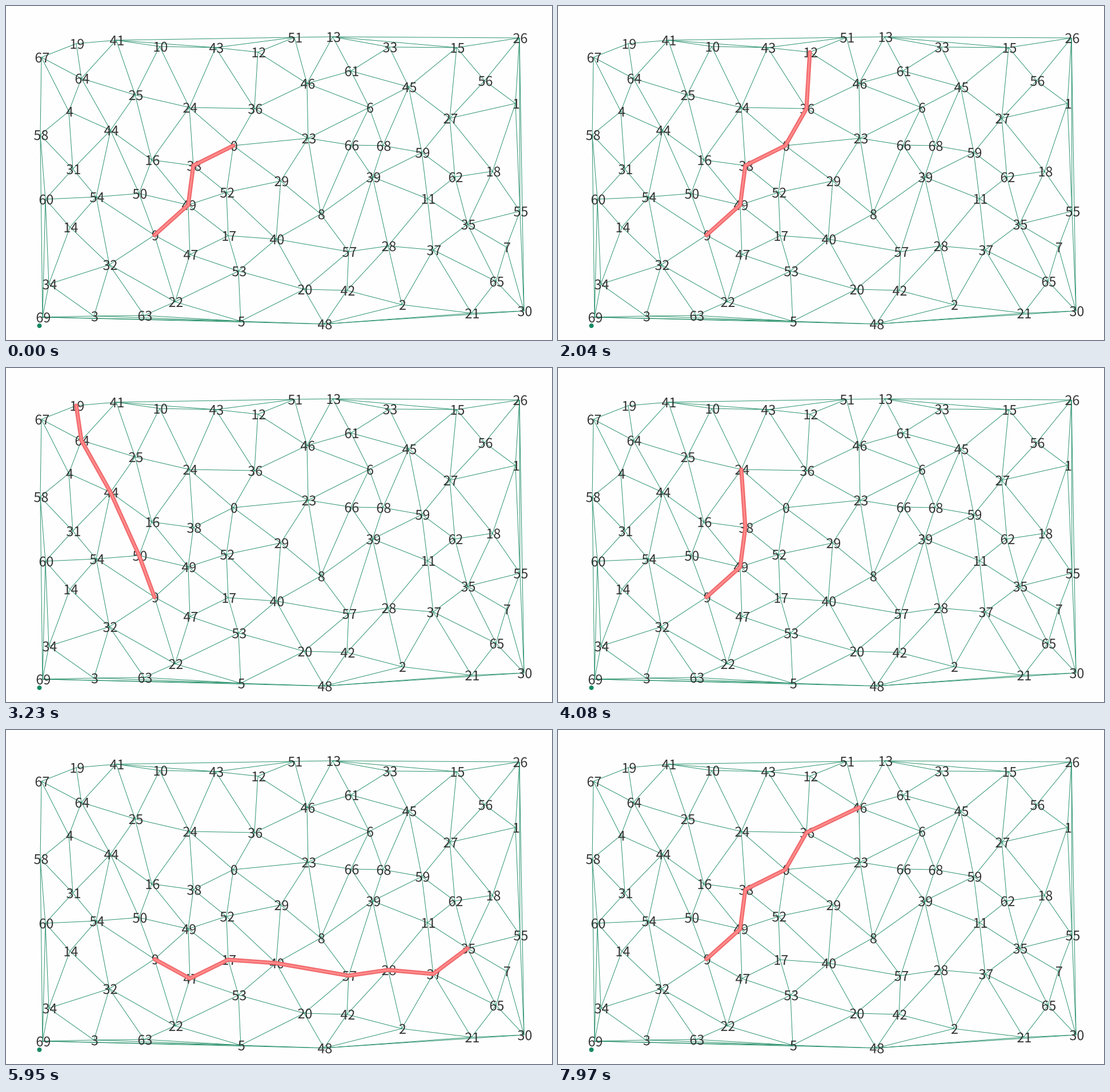
A matplotlib script for the animation above (8 s loop, 956 by 586 pixels).

```python
import matplotlib.pyplot as plt
import numpy as np
from matplotlib.animation import FuncAnimation
from matplotlib.collections import LineCollection
from matplotlib.patches import Circle, PathPatch
from matplotlib.path import Path
from matplotlib.textpath import TextPath
from matplotlib.tri import Triangulation

W, H, DPI = 956, 586, 64
PX = 72 / DPI                    # points per pixel
LOOP, TICK = 8000, 20            # ms
STEP, PAUSE_AT, PAUSE = 170, 35, 150
START = 9
FONT_PX, ADVANCE, DIGIT_H = 23.3, 0.555, 0.733

# Key points: node n sits at NODES[n]; edges, labels and routes follow from them
NODES = np.array([
    (398, 245), (892, 171), (693, 524), (154, 544), (110, 185),
    (411, 553), (636, 178), (876, 423), (551, 365), (260, 402),
    (269, 71), (738, 338), (441, 81), (572, 54), (112, 388),
    (789, 73), (255, 270), (389, 403), (852, 290), (123, 66),
    (522, 497), (815, 539), (296, 519), (529, 232), (321, 178),
    (226, 156), (899, 56), (777, 197), (669, 421), (481, 307),
    (907, 535), (117, 286), (181, 454), (671, 72), (75, 488),
    (808, 383), (435, 180), (748, 428), (328, 280), (642, 300),
    (473, 409), (193, 60), (597, 499), (367, 73), (183, 218),
    (705, 142), (527, 136), (322, 436), (557, 558), (319, 349),
    (233, 329), (505, 55), (386, 327), (407, 465), (158, 335),
    (900, 360), (838, 131), (600, 431), (60, 226), (728, 257),
    (69, 339), (604, 114), (786, 300), (242, 543), (132, 127),
    (858, 483), (604, 244), (62, 90), (660, 245), (64, 546),
])


def shortest_tree(edges, start):
    """Dijkstra over straight-line lengths; returns each node's parent."""
    near = {i: [] for i in range(len(NODES))}
    for a, b in edges:
        d = np.hypot(*(NODES[a] - NODES[b]))
        near[a].append((b, d))
        near[b].append((a, d))
    dist = {i: np.inf for i in near}
    dist[start] = 0
    parent = {}
    todo = set(near)
    while todo:
        a = min(todo, key=dist.get)
        todo.remove(a)
        for b, d in near[a]:
            if dist[a] + d < dist[b]:
                dist[b] = dist[a] + d
                parent[b] = a
    return parent


def route(goal):
    path = [goal]
    while path[-1] in parent:
        path.append(parent[path[-1]])
    return NODES[path[::-1]]


def label(n):
    text = str(n)
    glyphs = TextPath((0, 0), text, size=FONT_PX,
                      prop={"family": "Noto Sans CJK JP"})
    x, y = NODES[n]
    left = x + 1.4 - len(text) * ADVANCE * FONT_PX / 2
    base = y + 0.5 + DIGIT_H * FONT_PX / 2
    return Path(glyphs.vertices * (1, -1) + (left, base), glyphs.codes)


def goal_at(ms):
    n = int(ms // STEP)
    if n > PAUSE_AT:
        n = max(PAUSE_AT, int((ms - PAUSE) // STEP))
    return n


edges = [(int(a), int(b)) for a, b in Triangulation(*NODES.T).edges]
parent = shortest_tree(edges, START)
routes = [route(n) for n in range(goal_at(LOOP) + 1)]

fig = plt.figure(figsize=(W / DPI, H / DPI), dpi=DPI, facecolor="#fefefe")
ax = fig.add_axes([0, 0, 1, 1])
ax.set(xlim=(0, W), ylim=(H, 0))
ax.axis("off")

ax.add_collection(LineCollection([NODES[[a, b]] for a, b in edges],
                                 colors="#259069", linewidths=0.95 * PX,
                                 zorder=1))
ax.add_patch(Circle((58.5, 561), 4, color="#168a62", lw=0, zorder=1))
labels = Path.make_compound_path(*[label(n) for n in range(len(NODES))])
ax.add_patch(PathPatch(labels, fc="#333333", lw=0, zorder=2))

strokes = [ax.plot([], [], color=color, lw=width * PX, zorder=3 + i,
                   solid_capstyle="round", solid_joinstyle="round")[0]
           for i, (color, width) in enumerate([("#f0686b", 7.2),
                                               ("#ff8c8c", 3)])]


def draw(frame):
    points = routes[goal_at(frame * TICK + TICK / 2)]
    if len(points) < 2:
        points = np.empty((0, 2))
    for stroke in strokes:
        stroke.set_data(*points.T)
    return strokes


anim = FuncAnimation(fig, draw, frames=LOOP // TICK, interval=TICK,
                     init_func=lambda: draw(0), repeat=True, repeat_delay=0)
plt.show()
```
